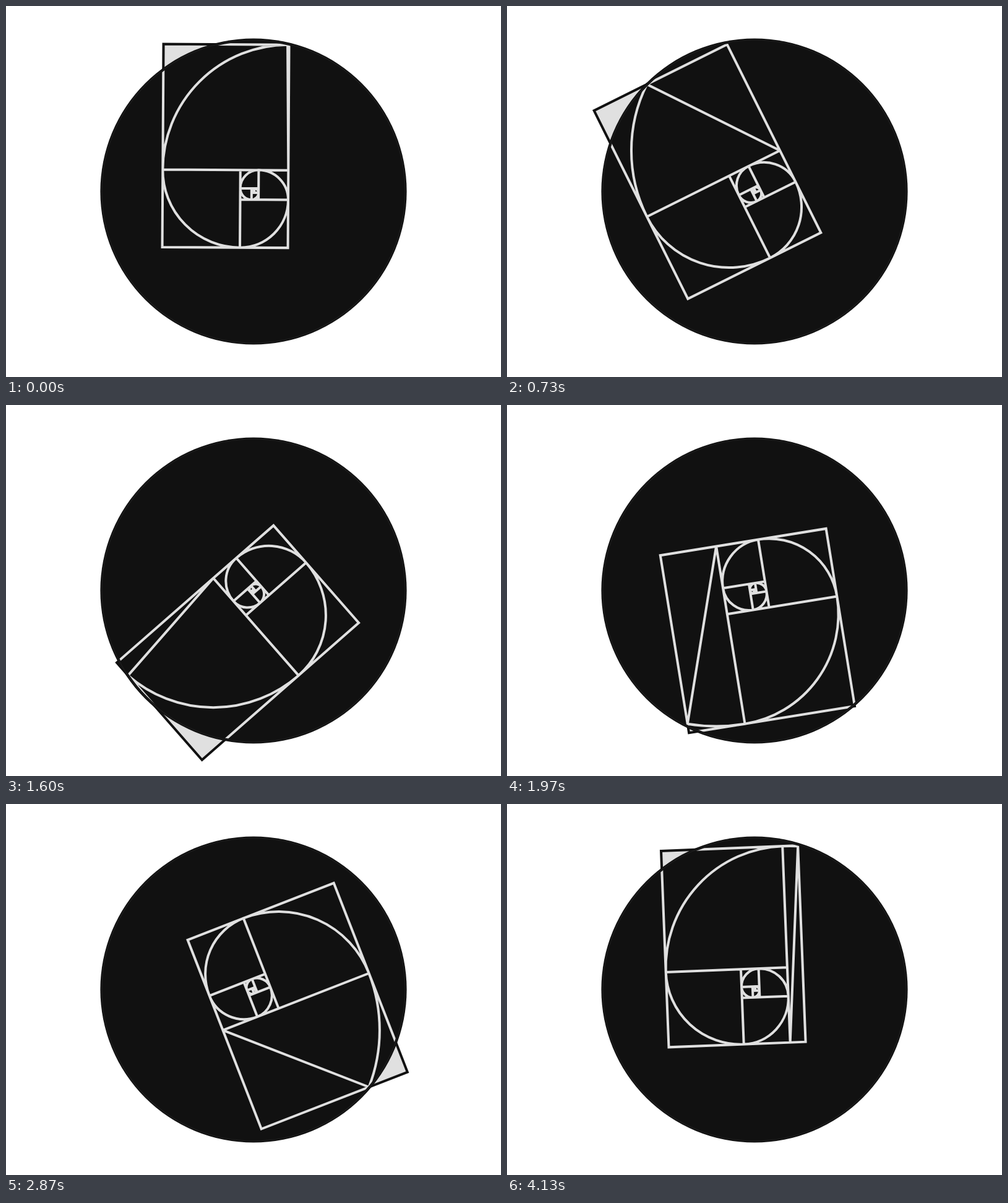
Animation of 800x600 px, one loop 4160 ms. Source, as an HTML page with a canvas:

```html
<!DOCTYPE html>
<html lang="en">
<head>
<meta charset="utf-8">
<title>Golden spiral</title>
<style>
  html, body { margin: 0; width: 100%; height: 100%; overflow: hidden; background: #fff; }
  canvas { display: block; }
</style>
</head>
<body>
<canvas id="stage" width="800" height="600"></canvas>
<script>
const ctx = document.getElementById("stage").getContext("2d");

const LOOP = 4160, STEPS = 8, DEPTH = 11;
const LEAD = 3;                  // ms the motion runs ahead of the clock
const PHI = (1 + Math.sqrt(5)) / 2;
const QUARTER = Math.PI / 2;
const LONG = 327.5;              // long side once a square has fully folded away
const RIM = 247.6, SEAM = 245, INNER = 243;
const DARK = "#111", LIGHT = "#e0e0e0";

// Golden rectangle of height 1, seen from the pole of its spiral
const NEAR = 1 / (PHI * PHI + 1), FAR = 1 - NEAR;
const CX = NEAR / PHI, LEFT = -FAR / PHI;

function line(x1, y1, x2, y2) {
  ctx.moveTo(x1, y1);
  ctx.lineTo(x2, y2);
}

function sector(size, sweep) {
  const x = CX * size, y = NEAR * size;
  line(x, -FAR * size, x, y);
  ctx.moveTo(x, y - size);
  ctx.arc(x, y, size, -QUARTER, sweep - QUARTER);
}

function frameRect(size, sweep) {
  const width = (1 / PHI + Math.sin(sweep)) * size;
  ctx.rect(LEFT * size, -FAR * size, width, size);
}

function strokeSpiral(pose, color) {
  const { size, sweep, turn } = pose;
  ctx.save();
  ctx.rotate(turn);
  ctx.strokeStyle = color;
  ctx.lineWidth = 4;
  ctx.beginPath();
  frameRect(size, sweep);
  sector(size, sweep);
  ctx.lineTo(CX * size, NEAR * size);
  let s = size;
  for (let i = 0; i < DEPTH; i++) {
    s /= PHI;
    ctx.rotate(-QUARTER);
    sector(s, QUARTER);
  }
  ctx.stroke();
  ctx.restore();
}

function disc(radius) {
  ctx.beginPath();
  ctx.arc(0, 0, radius, 0, 2 * Math.PI);
}

function poseAt(time) {
  const p = ((time + LEAD) % LOOP) / LOOP;
  const step = Math.floor(p * STEPS);
  const open = 1 - (p * STEPS - step);
  return {
    size: LONG / (1 + open * (PHI - 1)),
    sweep: open * QUARTER,
    turn: p * 2 * Math.PI - (step + 1) * QUARTER
  };
}

function draw(time) {
  const pose = poseAt(time);
  ctx.setTransform(1, 0, 0, 1, 0, 0);
  ctx.fillStyle = "#fff";
  ctx.fillRect(0, 0, 800, 600);
  ctx.translate(400, 300);

  ctx.save();
  ctx.rotate(pose.turn);
  ctx.beginPath();
  frameRect(pose.size, pose.sweep);
  ctx.fillStyle = LIGHT;
  ctx.fill();
  ctx.restore();
  strokeSpiral(pose, DARK);

  disc(RIM);
  ctx.fillStyle = DARK;
  ctx.fill();
  disc(SEAM);
  ctx.strokeStyle = "#1e1e1e";
  ctx.lineWidth = 1.2;
  ctx.stroke();

  ctx.save();
  disc(INNER);
  ctx.clip();
  strokeSpiral(pose, LIGHT);
  ctx.restore();
}

const start = performance.now();
function tick() {
  draw(performance.now() - start);
  requestAnimationFrame(tick);
}
tick();
</script>
</body>
</html>
```
